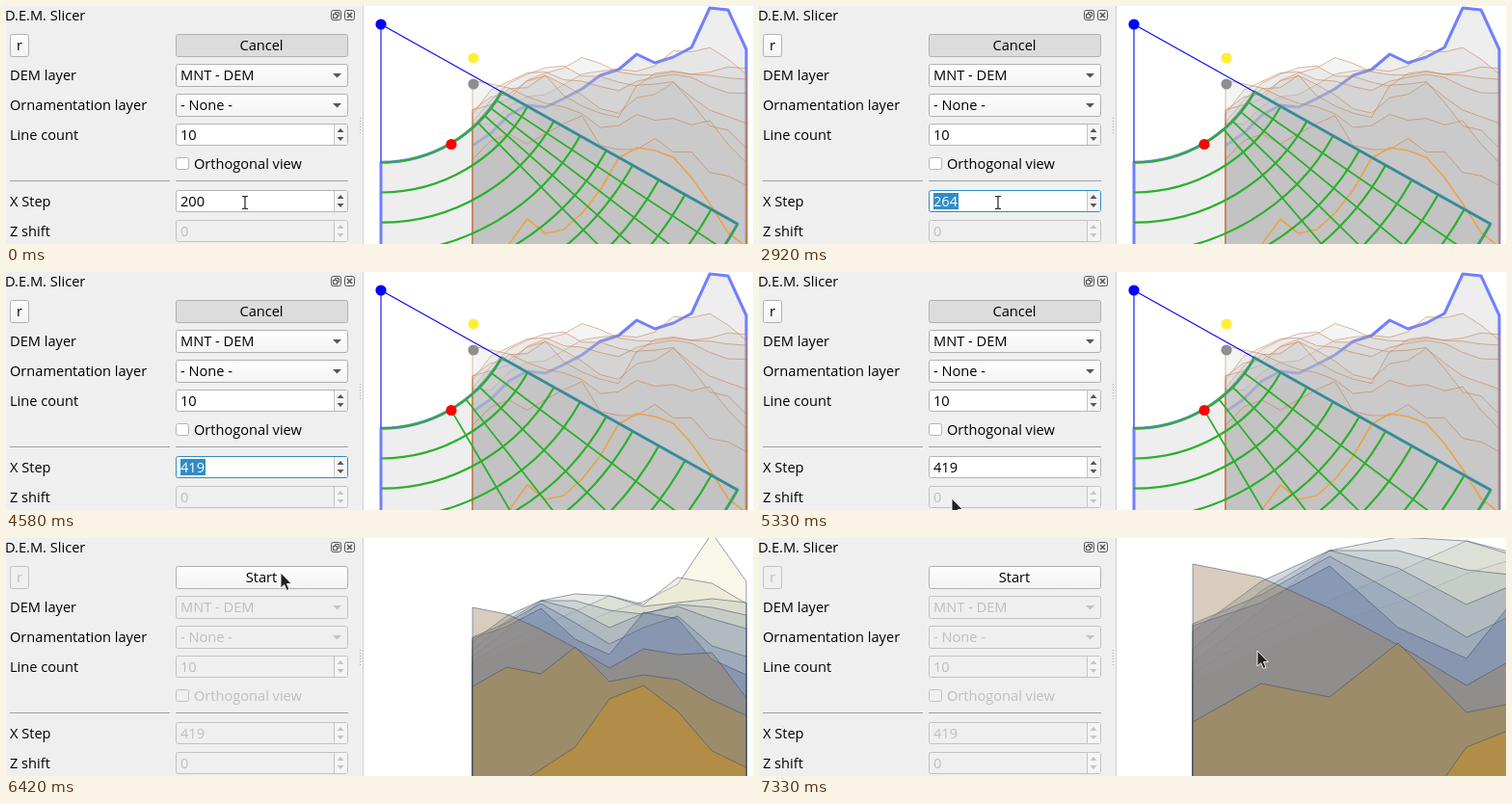
An HTML page for the animation above (8000 ms loop, 775 px wide and 247 px high).

```html
<!DOCTYPE html>
<html lang="en">
<head>
<meta charset="utf-8">
<title>D.E.M. Slicer</title>
<style>
  html, body { margin: 0; width: 100%; height: 100%; overflow: hidden; background: #fff; }
  svg { display: block; width: 775px; height: 247px; }
  text { font: 14.6px "Open Sans", "Noto Sans", sans-serif; fill: #000; white-space: pre; }
  .box { fill: #fff; stroke: #b4b4b4; }
  .button { fill: url(#face); stroke: #b0b0b0; }
  .pressed { fill: #dcdcdc; }
  .mark { fill: #555; }
  .dim text, .off .control text { fill: #bebebe; }
  .dim .mark, .off .control .mark { fill: #c4c4c4; }
  .dim .box, .off .control .box, .off .control .button { fill: #efefef; stroke: #c2c2c2; }
  .focused .box { stroke: #308cc6; }
  .selected text { fill: #fff; }
  .off .tool { display: none; }
  .line { fill: none; stroke-linejoin: round; }
  .blue { stroke: #7080ff; stroke-width: 3; stroke-linejoin: round; }
  .shade { fill: #000; fill-opacity: .067; }
  .green { fill: none; stroke: #2bb02b; stroke-width: 2.2; }
  .spokes { stroke-width: 1.8; }
  .slice { stroke: #3c4664; stroke-opacity: .65; stroke-width: .8; vector-effect: non-scaling-stroke; }
  .profile { fill: #bcbcbc; fill-opacity: .16; stroke: #c87840; stroke-opacity: .6; stroke-width: .9; }
</style>
</head>
<body>
<svg id="stage" viewBox="0 0 775 247">
  <defs>
    <linearGradient id="face" x2="0" y2="1">
      <stop stop-color="#fefefe"/><stop offset="1" stop-color="#f3f3f3"/>
    </linearGradient>
  </defs>
  <rect width="775" height="247" fill="#fff"/>
  <g id="slices"></g>
  <g id="tool" class="tool"></g>
  <g id="panel">
    <rect width="371" height="247" fill="#efefef"/>
    <path d="M370.5 0V247" stroke="#cfcfcf"/>
    <path d="M367.5 116V133" stroke="#a8a8a8" stroke-dasharray="1 2"/>
    <path d="M4 181.5H170M176 181.5H355" stroke="#a0a0a0"/>
    <g fill="none" stroke="#555">
      <rect x="337.5" y="4.5" width="10" height="10" rx="2"/>
      <rect x="339.5" y="8.5" width="4" height="4"/>
      <path d="M341.5 8V6.5H345.5V10.5H344"/>
      <rect x="351.5" y="4.5" width="10" height="10" rx="2"/>
      <path d="M354 7L359 12M359 7L354 12" stroke-width="1.6"/>
    </g>
  </g>
  <path id="beam" d="M245 197.5H247L248 198.5L249 197.5H251M248 198V210M245 210.5H247L248 209.5L249 210.5H251"
    fill="none" stroke="#222" stroke-width="1.2"/>
  <path id="arrow" d="M0 0V16L3.7 12.7L6.3 18.5L9 17.3L6.4 11.6H11.3Z" fill="#222" stroke="#fff" stroke-width=".9"/>
</svg>
<script>
const LOOP = 8000, STOP_AT = 6420, ZOOM_AT = 7250;
const LEFT = 484, RIGHT = 768, FLOOR = 420;
const $ = id => document.getElementById(id);
const stage = $('stage'), panel = $('panel'), tool = $('tool'), slices = $('slices');

function add(parent, tag, attrs = {}, content) {
  const node = document.createElementNS('http://www.w3.org/2000/svg', tag);
  for (const key in attrs) node.setAttribute(key, attrs[key]);
  if (content !== undefined) node.textContent = content;
  return parent.appendChild(node);
}
const label = (parent, x, y, content, anchor = 'start') =>
  add(parent, 'text', { x, y, 'text-anchor': anchor }, content);
const path = (parent, d, attrs) => add(parent, 'path', { d, ...attrs });
const group = (parent, cls) => add(parent, 'g', { class: cls });
const frame = (parent, x, y, width, height, cls) =>
  add(parent, 'rect', { x: x + .5, y: y + .5, width, height, rx: 2, class: cls });

// Panel
function combo(y, content) {
  const g = group(panel, 'control');
  frame(g, 176, y, 178, 23, 'button');
  label(g, 181, y + 17, content);
  path(g, `M339 ${y + 10}h9l-4.5 4.5z`, { class: 'mark' });
}
function spin(y, content, cls = '') {
  const g = group(panel, 'control ' + cls);
  frame(g, 176, y, 178, 22, 'box');
  path(g, `M340.5 ${y + 1}v21`, { stroke: '#c4c4c4' });
  add(g, 'rect', { x: 341, y: y + 1, width: 13, height: 21, fill: '#f4f4f4' });
  path(g, `M343.5 ${y + 9}h7l-3.5 -4zM343.5 ${y + 14}h7l-3.5 4z`, { class: 'mark' });
  label(g, 181, y + 17, content);
  return g;
}
[['D.E.M. Slicer', 15, -1], ['DEM layer', 77], ['Ornamentation layer', 108],
 ['Line count', 139], ['X Step', 208], ['Z shift', 239]]
  .forEach(([content, y, x = 4]) => label(panel, x, y, content));

const reset = group(panel, 'control');
frame(reset, 4, 29, 19, 23, 'button');
label(reset, 14, 46, 'r', 'middle');

const actionFace = frame(panel, 176, 29, 178, 23, 'button');
const actionText = label(panel, 265, 46, 'Cancel', 'middle');

combo(60, 'MNT - DEM');
combo(91, '- None -');
spin(122, '10');
const check = group(panel, 'control');
frame(check, 176, 157, 13, 12, 'box');
label(check, 195, 169, 'Orthogonal view');
const stepBox = spin(191, '200');
const stepText = stepBox.querySelector('text');
const selection = add(stepBox, 'rect', { x: 181, y: 194, width: 26, height: 17, fill: '#308cc6' });
stepBox.insertBefore(selection, stepText);
const caret = path(stepBox, 'M206.5 194V211', { stroke: '#000' });
spin(222, '0', 'dim');

// Terrain, back to front: fill colour, opacity, heights
const terrain = [
  ['240,235,200', .4, [134, 117, 103, 92, 77, 66, 48, -5, 45]],
  ['215,215,190', .4, [128, 108, 91, 76, 60, 69, 41, 47, 68]],
  ['190,200,190', .4, [123, 96, 65, 58, 60, 71, 67, 63, 67]],
  ['165,180,185', .4, [116, 86, 65, 65, 75, 79, 69, 72, 80]],
  ['145,160,180', .4, [107, 81, 65, 74, 93, 78, 71, 84, 94]],
  ['130,148,180', .4, [103, 88, 68, 88, 110, 93, 81, 112, 123]],
  ['102,120,158', .4, [104, 92, 73, 105, 121, 77, 84, 126, 142]],
  ['155,128,90', .4, [72, 79, 95, 114, 135, 115, 121, 119, 166]],
  ['172,138,63', .45, [154, 134, 141, 113, 149, 142, 147, 168, 184]],
  ['202,142,32', .45, [290, 262, 240, 217, 167, 153, 180, 221, 238]]
];
const polyline = ys => 'M' + ys.map((y, i) =>
  `${(LEFT + (RIGHT - LEFT) * i / (ys.length - 1)).toFixed(1)} ${y.toFixed(1)}`).join('L');
const area = ys => `${polyline(ys)}V${FLOOR}H${LEFT}Z`;

for (const [rgb, alpha, ys] of terrain)
  path(slices, area(ys), { class: 'slice', fill: `rgba(${rgb},${alpha})` });

// Fan-shaped sampling grid
const CX = 389, CY = 19, INNER = 143.3, OUTER = 424, SPAN = Math.atan2(125, 70);
const at = (r, angle) => `${(CX + r * Math.sin(angle)).toFixed(2)} ${(CY + r * Math.cos(angle)).toFixed(2)}`;
const arc = r => `M${at(r, 0)}A${r} ${r} 0 0 0 ${at(r, SPAN)}`;
const spoke = angle => `M${at(INNER, angle)}L${at(OUTER, angle)}`;
const fan = `${arc(INNER)}L${at(OUTER, SPAN)}A${OUTER} ${OUTER} 0 0 1 ${at(OUTER, 0)}Z`;

// Fine profiles: the coarse heights resampled with a little roughness
let seed = 7;
const random = () => (seed = seed * 16807 % 2147483647) / 2147483647;
function refine(ys) {
  return Array.from({ length: 16 }, (_, i) => {
    const p = i / 15 * 8, k = Math.min(7, Math.floor(p));
    return ys[k] + (ys[k + 1] - ys[k]) * (p - k) + (random() - .5) * 13;
  });
}
const ridge = [145, 132, 113, 103, 105, 96, 86, 72, 66, 50, 59, 53, 43, 2, 4, 45];
const crest = [290, 270, 247, 221, 236, 232, 215, 191, 158, 147, 150, 157, 178, 205, 235, 250];
path(tool, fan, { class: 'shade' });
path(tool, area(ridge), { class: 'shade' });
path(tool, `${polyline(ridge)}V${FLOOR}`, { class: 'line blue' });
for (const [, , ys] of terrain.slice(1, 9)) path(tool, area(refine(ys)), { class: 'profile' });
path(tool, polyline(crest), { class: 'line', stroke: '#e8a545', 'stroke-width': 1.6 });

path(tool, fan, { class: 'line blue' });
path(tool, `M${CX} ${CY}V162M${CX} ${CY}L${at(INNER, SPAN)}`, { stroke: '#0000ff', 'stroke-width': 1.1 });
for (let i = 0; i < 10; i++) path(tool, arc(INNER + (OUTER - INNER) * i / 9), { class: 'green' });
path(tool, spoke(SPAN), { stroke: '#2f9478', 'stroke-width': 2.2 });
const spokes = path(tool, '', { class: 'green spokes' });
[[CX, CY, '#0000ff'], [485, 54, '#ffee38'], [485, 81, '#8e8e92'], [462, 143.5, '#ff0000']]
  .forEach(([cx, cy, fill]) => add(tool, 'circle', { cx, cy, r: 5.6, fill }));

function spokePath(step) {
  const count = Math.ceil(2990 / step);
  return [1, 2, 3, 4].map(k => spoke(SPAN * (1 - k / count))).join('');
}

// Timeline
const within = (t, ...spans) => spans.some(([from, to]) => t >= from && t < to);
const show = (node, on) => node.setAttribute('visibility', on ? 'visible' : 'hidden');
const clamp = v => Math.max(0, Math.min(1, v));
const stepAt = t => t < 2830 ? 200 : Math.min(419, Math.round(212 + Math.floor((t - 2828) / 84) * 51.75));
const route = [[5330, 200, 235], [6080, 285, 39], [6170, 285, 36], [6580, 285, 36], [7170, 517, 117]];

function arrowAt(t) {
  let [, x, y] = route[0];
  for (let i = 1; i < route.length; i++) {
    const [t0, x0, y0] = route[i - 1], [t1, x1, y1] = route[i];
    const p = clamp((t - t0) / (t1 - t0)), e = p * p * (3 - 2 * p);
    x += (x1 - x0) * e;
    y += (y1 - y0) * e;
  }
  return `translate(${x} ${y})`;
}

let shownStep;
function render(t) {
  const off = t >= STOP_AT, selected = within(t, [2830, 5170]);
  stage.classList.toggle('off', off);
  actionFace.classList.toggle('pressed', !off);
  actionText.textContent = off ? 'Start' : 'Cancel';

  stepBox.classList.toggle('focused', within(t, [420, 5170]));
  stepBox.classList.toggle('selected', selected);
  show(selection, selected);
  show(caret, within(t, [420, 920], [1500, 2250]));
  show($('beam'), t < 4420);
  const step = stepAt(t);
  if (step !== shownStep) {
    shownStep = step;
    stepText.textContent = step;
    spokes.setAttribute('d', spokePath(step));
  }

  slices.setAttribute('opacity', off ? 1 : .5 * clamp((t - 5330) / 750));
  slices.setAttribute('transform', t >= ZOOM_AT ? 'translate(-518 -117) scale(2)' : '');
  show($('arrow'), t >= 5330);
  $('arrow').setAttribute('transform', arrowAt(t));
}

const start = performance.now();
function tick() {
  render((performance.now() - start) % LOOP);
  requestAnimationFrame(tick);
}
tick();
</script>
</body>
</html>
```
